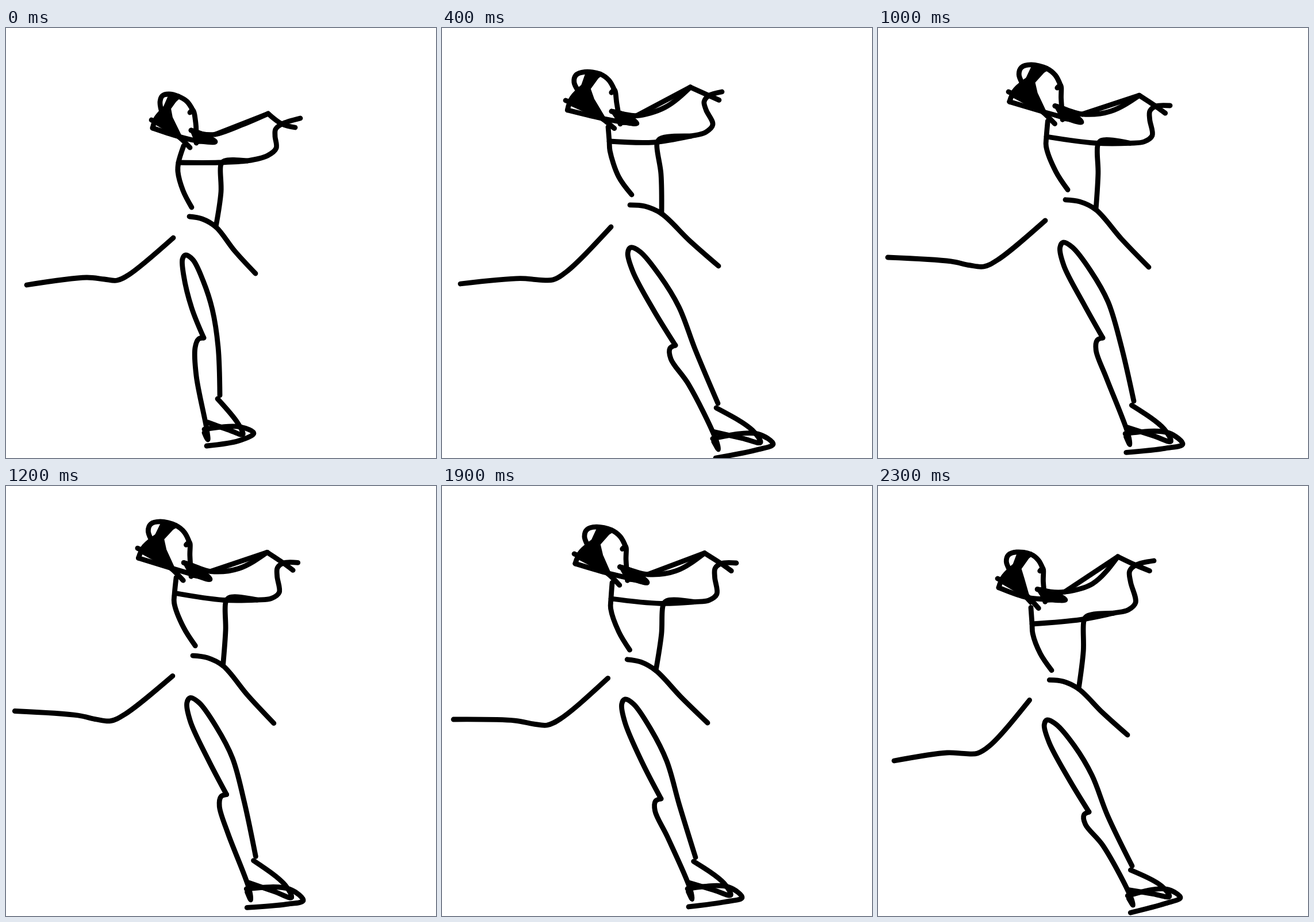
Animation, 748 px wide and 748 px high, one loop 2.4 s. Source, as an HTML page with a canvas:

```html
<!DOCTYPE html>
<html lang="en">
<head>
<meta charset="utf-8">
<title>Skater</title>
<style>
html, body { margin: 0; width: 100%; height: 100%; overflow: hidden; background: #fff; }
canvas { display: block; width: 748px; height: 748px; }
</style>
</head>
<body>
<canvas id="stage" width="748" height="748"></canvas>
<script>
const ctx = document.getElementById('stage').getContext('2d');
const SIZE = 748, LOOP = 2400, STEP = 100;
const keys = [0, 400, 700, 1000, 1500, 1900, 2300];

// Leading joints: x, y at every key time.
const upper = {
  bunTip:   [253,160, 215,126, 210,112, 227,111, 226,106, 230,118, 208,161],
  chin:     [364,198, 339,166, 341,158, 354,164, 352,159, 357,168, 326,198],
  finger:   [512,157, 487,111, 491,115, 508,135, 502,124, 512,134, 480,130],
  elbow:    [470,209, 471,168, 474,173, 477,187, 472,178, 478,188, 448,203],
  shoulder: [300,234, 291,197, 288,184, 293,189, 292,182, 294,196, 268,240],
  belly:    [365,346, 382,323, 384,313, 379,316, 376,308, 372,321, 349,353],
  hem:      [434,427, 481,414, 489,414, 471,416, 464,407, 462,412, 434,433]
};
const lower = {
  backToe:  [36,447, 32,445, 16,423, 17,399, 13,391, 20,406, 28,478],
  backKnee: [193,439, 193,438, 184,428, 184,415, 179,405, 183,416, 173,465],
  thigh:    [312,395, 328,382, 327,375, 322,373, 319,363, 318,371, 294,407],
  knee:     [344,539, 406,552, 413,555, 391,539, 380,540, 381,544, 367,567],
  shin:     [331,605, 429,620, 441,625, 397,608, 386,605, 392,610, 391,625],
  ankle:    [372,639, 480,653, 492,655, 445,649, 436,640, 441,646, 442,661],
  blade:    [431,705, 576,724, 594,729, 530,724, 521,718, 522,716, 526,716]
};
// Followers: the first two poses only, then carried by the leaders.
const followers = {
  bunTop: [272,118, 233,82], forehead: [300,119, 275,80], eye: [325,143, 300,108],
  lock: [288,156, 263,124], mouth: [322,178, 295,145], jaw: [331,200, 310,167],
  nape: [309,205, 289,172], waist: [323,312, 330,290], armpit: [374,237, 374,201],
  sag: [412,168, 388,138], wrist: [456,149, 432,103], palm: [469,176, 456,128],
  sleeve: [420,231, 433,188], backHip: [291,365, 294,346], front: [359,490, 412,485],
  heel: [351,716, 481,733], toe: [412,707, 554,721], bladeOut: [349,727, 476,748]
};

// Lines through joints and loose points of the first pose.
const bodyLines = [
  ['backToe', 140,434, 171,437, 'backKnee', 214,429, 'backHip'],
  ['nape', 'shoulder', 299,250, 308,283, 'waist'],
  ['shoulder', 370,234, 'sleeve', 455,222, 'elbow', 468,188, 'palm', 480,167, 'finger'],
  ['sleeve', 380,231, 'armpit', 374,285, 'belly'],
  [364,185, 'wrist'],
  ['mouth', 340,184, 364,185, 'sag', 'wrist'],
  ['wrist', 480,167, 503,173],
  [319,328, 341,332, 'belly', 398,388, 'hem']
];
const legLines = [
  ['knee', 323,487, 309,430, 307,402, 'thigh', 325,403, 343,440, 'front', 369,555, 'ankle'],
  ['knee', 335,541, 329,556, 'shin', 349,697, 'heel', 345,704],
  [368,645, 403,687, 'toe', 387,699, 351,686],
  [345,698, 408,694, 'blade', 405,718, 'bladeOut']
];
const headLines = [
  [270,143, 268,128, 'bunTop', 283,115, 'forehead', 315,128, 'eye'],
  [320,147, 'eye', 330,165, 'jaw'],
  ['mouth', 342,185, 'chin', 331,196, 298,188, 255,174],
  ['bunTip', 290,180, 320,208],
  ['forehead', 262,156, 255,174]
];
const fills = [
  ['forehead', 285,116, 271,148, 260,166, 290,184, 309,199, 'lock', 285,140],
  ['mouth', 'chin', 'jaw']
];

// Carries p along with the points near it (turn, scale and shift).
function bend([x, y], from, to) {
  let sum = 0, px = 0, py = 0, qx = 0, qy = 0;
  const weights = from.map(([a, b], i) => {
    const d = (a - x) ** 2 + (b - y) ** 2 + 0.05;
    const w = 1 / (d * d);
    sum += w;
    px += w * a; py += w * b;
    qx += w * to[i][0]; qy += w * to[i][1];
    return w;
  });
  px /= sum; py /= sum; qx /= sum; qy /= sum;
  let re = 0, im = 0, norm = 0;
  weights.forEach((w, i) => {
    const a = from[i][0] - px, b = from[i][1] - py;
    const c = to[i][0] - qx, d = to[i][1] - qy;
    re += w * (a * c + b * d);
    im += w * (a * d - b * c);
    norm += w * (a * a + b * b);
  });
  re /= norm; im /= norm;
  const dx = x - px, dy = y - py;
  return [qx + re * dx - im * dy, qy + im * dx + re * dy];
}

const leaders = { ...upper, ...lower };
const pick = (row, i) => row.slice(i * 2, i * 2 + 2);
const lead = i => Object.values(leaders).map(row => pick(row, i));
const poses = keys.map((_, i) => lead(i).concat(Object.values(followers).map(row =>
  i < 2 ? pick(row, i) : bend(pick(row, 1), lead(1), lead(i)))));
const rest = poses[0];
const names = Object.keys({ ...leaders, ...followers });

function points(line) {
  const out = [];
  for (let i = 0; i < line.length; i++) {
    if (typeof line[i] === 'string') out.push(rest[names.indexOf(line[i])]);
    else out.push([line[i], line[++i]]);
  }
  return out;
}
const strokes = [...bodyLines, ...legLines, ...headLines].map(points);
const shapes = fills.map(points);

// Smooth curve through the key values, with free ends.
function valueAt(joint, axis, t) {
  const v = i => poses[i][joint][axis];
  const slope = i => (v(i + 1) - v(i)) / (keys[i + 1] - keys[i]);
  const last = keys.length - 1;
  const tangent = i => {
    if (i === 0) return slope(0);
    if (i === last) return slope(last - 1);
    const a = keys[i] - keys[i - 1], b = keys[i + 1] - keys[i];
    return (slope(i - 1) * b + slope(i) * a) / (a + b);
  };
  let i = 0;
  while (i < last - 1 && t >= keys[i + 1]) i++;
  const h = keys[i + 1] - keys[i], s = (t - keys[i]) / h, r = 1 - s;
  return v(i) * r * r * (1 + 2 * s) + v(i + 1) * s * s * (3 - 2 * s)
    + h * s * r * (tangent(i) * r - tangent(i + 1) * s);
}

// Centripetal spline as Bezier pieces.
function trace(p) {
  const gap = (a, b) => Math.sqrt(Math.hypot(b[0] - a[0], b[1] - a[1])) || 0.01;
  const tangent = (i, k) => {
    if (i === 0 || i === p.length - 1) return null;
    const a = gap(p[i - 1], p[i]), b = gap(p[i], p[i + 1]);
    return ((p[i][k] - p[i - 1][k]) / a * b + (p[i + 1][k] - p[i][k]) / b * a) / (a + b);
  };
  ctx.beginPath();
  ctx.moveTo(...p[0]);
  for (let i = 0; i < p.length - 1; i++) {
    const h = gap(p[i], p[i + 1]), c = [], d = [];
    for (let k = 0; k < 2; k++) {
      const chord = (p[i + 1][k] - p[i][k]) / h;
      let m = tangent(i, k), n = tangent(i + 1, k);
      if (m === null && n === null) m = n = chord;
      else if (m === null) m = (3 * chord - n) / 2;
      else if (n === null) n = (3 * chord - m) / 2;
      c[k] = p[i][k] + m * h / 3;
      d[k] = p[i + 1][k] - n * h / 3;
    }
    ctx.bezierCurveTo(...c, ...d, ...p[i + 1]);
  }
}

function draw(t) {
  const pose = rest.map((_, j) => [valueAt(j, 0, t), valueAt(j, 1, t)]);
  const place = line => line.map(p => bend(p, rest, pose));
  ctx.fillStyle = '#fff';
  ctx.fillRect(0, 0, SIZE, SIZE);
  ctx.fillStyle = ctx.strokeStyle = '#000';
  ctx.lineCap = ctx.lineJoin = 'round';
  ctx.lineWidth = 4;
  for (const shape of shapes) {
    ctx.beginPath();
    place(shape).forEach(p => ctx.lineTo(...p));
    ctx.closePath();
    ctx.fill();
    ctx.stroke();
  }
  ctx.lineWidth = 8.8;
  for (const line of strokes) {
    trace(place(line));
    ctx.stroke();
  }
}

const start = performance.now();
let shown = -1;
function tick() {
  const t = Math.max(0, performance.now() - start) % LOOP;
  const now = Math.floor(t / STEP) * STEP;
  if (now !== shown) draw(shown = now);
  requestAnimationFrame(tick);
}
tick();
</script>
</body>
</html>
```
